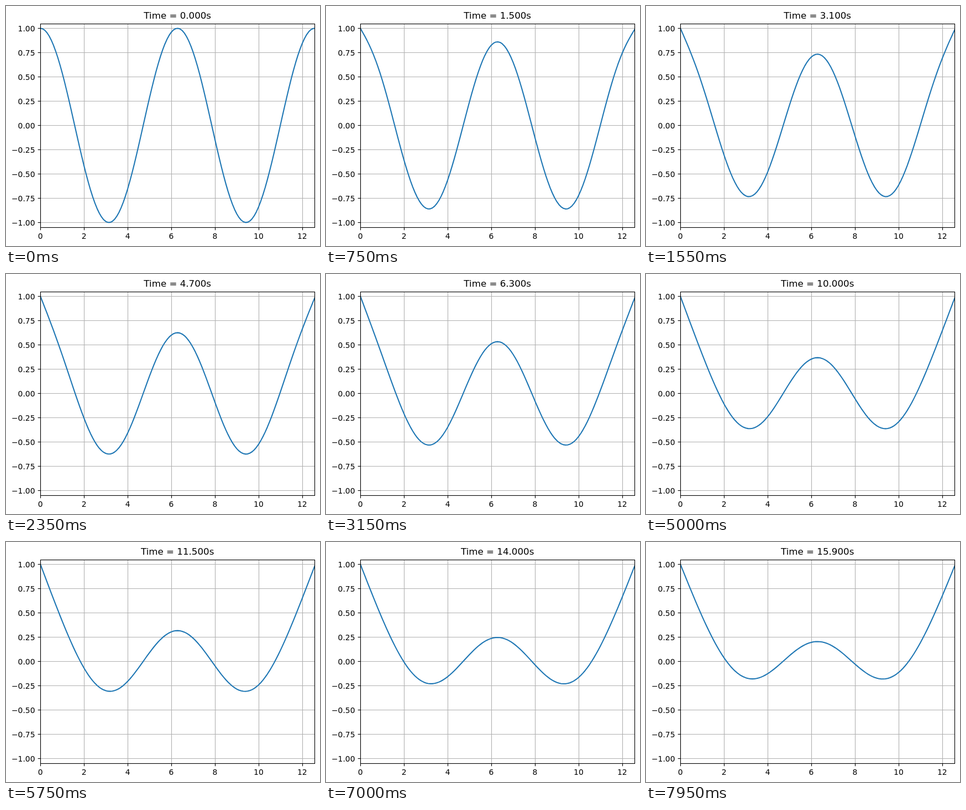
Animation of 568x435 px, one loop 8000 ms. Source, as an HTML page with a canvas:

```html
<!DOCTYPE html>
<html lang="en">
<head>
<meta charset="utf-8">
<title>Diffusing cosine</title>
<style>
  html, body { margin: 0; width: 100%; height: 100%; overflow: hidden; background: #fff; }
  canvas { display: block; }
</style>
</head>
<body>
<canvas id="plot" width="568" height="435"></canvas>
<script>
const ctx = document.getElementById('plot').getContext('2d');

const FRAMES = 160, FRAME_MS = 50, FRAME_TIME = 0.1;
const DIFFUSIVITY = 0.1, DX = 0.1, POINTS = 127, SUBSTEPS = 10;

const LEFT = 62.2, TOP = 31.6, WIDTH = 496, HEIGHT = 369.6;
const toX = x => LEFT + x * WIDTH / (4 * Math.PI);
const toY = y => TOP + HEIGHT / 2 - y * HEIGHT / 2.1;
const snap = v => Math.round(v) + 0.5;
const box = { l: snap(LEFT), r: snap(LEFT + WIDTH), t: snap(TOP), b: snap(TOP + HEIGHT) };

const THIN = 1.11, TICK = 4.86, LABEL_GAP = 9.72;
const xTicks = [0, 2, 4, 6, 8, 10, 12];
const yTicks = Array.from({ length: 9 }, (_, i) => (i - 4) / 4);

// Heat equation with both ends held at their starting values.
function diffuse(u) {
  const r = DIFFUSIVITY * FRAME_TIME / SUBSTEPS / (DX * DX);
  for (let s = 0; s < SUBSTEPS; s++) {
    const p = u;
    u = p.map((v, i) => i === 0 || i === POINTS - 1
      ? v : v + r * (p[i - 1] - 2 * v + p[i + 1]));
  }
  return u;
}

const states = [Array.from({ length: POINTS }, (_, i) => Math.cos(i * DX))];
while (states.length < FRAMES) states.push(diffuse(states[states.length - 1]));

function line(x1, y1, x2, y2, color) {
  ctx.strokeStyle = color;
  ctx.lineWidth = THIN;
  ctx.beginPath();
  ctx.moveTo(x1, y1);
  ctx.lineTo(x2, y2);
  ctx.stroke();
}

function label(text, x, y, size, align) {
  ctx.font = `${size}px "DejaVu Sans", sans-serif`;
  ctx.textAlign = align;
  ctx.fillStyle = '#000';
  ctx.fillText(text, x, y);
}

function drawAxes() {
  for (const v of xTicks) {
    const x = snap(toX(v));
    line(x, box.t, x, box.b, '#b0b0b0');
    line(x, box.b, x, box.b + TICK, '#000');
    label(String(v), toX(v), 422, 13.89, 'center');
  }
  for (const v of yTicks) {
    const y = snap(toY(v));
    line(box.l, y, box.r, y, '#b0b0b0');
    line(box.l - TICK, y, box.l, y, '#000');
    label(v.toFixed(2).replace('-', '\u2212'), LEFT - LABEL_GAP,
      Math.round(toY(v) + 5.5), 13.89, 'right');
  }
}

function drawCurve(u) {
  ctx.save();
  ctx.beginPath();
  ctx.rect(LEFT, TOP, WIDTH, HEIGHT);
  ctx.clip();
  ctx.beginPath();
  u.forEach((v, i) => ctx.lineTo(toX(i * DX), toY(v)));
  ctx.strokeStyle = '#1f77b4';
  ctx.lineWidth = 2.083;
  ctx.lineJoin = 'round';
  ctx.lineCap = 'square';
  ctx.stroke();
  ctx.restore();
}

function draw(index) {
  ctx.fillStyle = '#fff';
  ctx.fillRect(0, 0, 568, 435);
  drawAxes();
  drawCurve(states[index]);
  ctx.strokeStyle = '#000';
  ctx.lineWidth = THIN;
  ctx.strokeRect(box.l, box.t, box.r - box.l, box.b - box.t);
  label(`Time = ${(index * FRAME_TIME).toFixed(3)}s`, LEFT + WIDTH / 2, 23, 16.667, 'center');
}

const start = performance.now();
function tick() {
  const elapsed = performance.now() - start;
  draw(Math.floor(elapsed / FRAME_MS) % FRAMES);
  requestAnimationFrame(tick);
}
tick();
</script>
</body>
</html>
```
